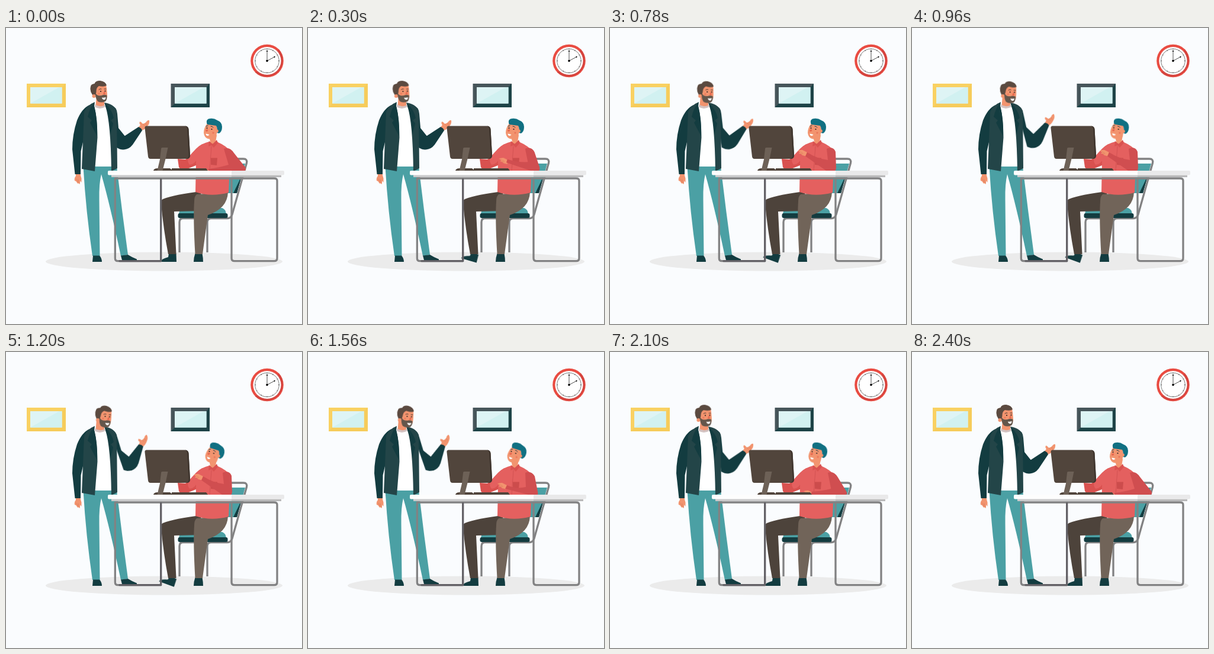
Animation, 500 px wide and 500 px high, one loop 2.73 s. Source, as an HTML page:

```html
<!DOCTYPE html>
<html lang="en">
<head>
<meta charset="utf-8">
<title>Office talk</title>
<style>
html, body { margin: 0; width: 100%; height: 100%; overflow: hidden; background: #fafcfe; }
svg { display: block; width: 100vw; height: 100vh; }

.teal { fill: #4ba0a4; }
.dark { fill: #133c40; }
.coat { fill: #234548; }
.skin { fill: #f2946f; }
.blush { fill: #e8684f; }
.red { fill: #e4605f; }
.ink { fill: #2b2523; }
.line { fill: none; stroke-linecap: round; stroke-linejoin: round; }
.steel { stroke: #828283; stroke-width: 3.3; }

.move { animation: 2730ms ease-in-out infinite; }
.head { transform-origin: 157px 133px; animation-name: nod; animation-timing-function: linear; }
.arm { transform-origin: 180px 145px; animation-name: raise; }
.fore { transform-origin: 203px 195px; animation-name: bend; }
.look { transform-origin: 348px 191px; animation-name: look; }
.foot { transform-origin: 281px 384px; animation-name: tap; }
.sleeve { animation-name: sleeve; animation-timing-function: linear; }
.hand { animation-name: hand; animation-timing-function: linear; }

@keyframes nod {
  0%, 9%, 80%, 100% { transform: none; }
  44%, 57% { transform: translate(3.5px, 1px) rotate(9deg); }
}
@keyframes raise {
  0%, 23%, 81%, 100% { transform: none; }
  44%, 57% { transform: rotate(-12deg); }
}
@keyframes bend {
  0%, 23%, 81%, 100% { transform: none; }
  44%, 57% { transform: rotate(-6deg); }
}
@keyframes look {
  0%, 29%, 86%, 100% { transform: none; }
  44%, 68% { transform: rotate(10deg); }
}
@keyframes tap {
  0%, 2%, 57%, 100% { transform: none; }
  15%, 48% { transform: rotate(20deg); }
}
@keyframes sleeve {
  0%, 87.9%, 100% { d: path("M368 204Q378 200 385 211L404 235Q408 242 398 242L342 242L342 238Q360 236 376 231Z"); }
  19%, 48% { d: path("M366 204Q377 199 381 209L382 236Q382 246 368 243L330 216.5L333 210Q350 221 368 223Z"); }
  57.1% { d: path("M367 204Q377 200 383 210L388 236Q390 245 380 243L333 231L336 225Q352 232 368 228Z"); }
  67% { d: path("M368 204Q377 200 384 211L395 236Q398 243 388 242L337 241L339 234Q357 234 371 231Z"); }
}
@keyframes hand {
  0%, 87.9%, 100% { transform: translate(13px, 32px); }
  19%, 48% { transform: none; }
  57.1% { transform: translate(3px, 15px); }
  67% { transform: translate(7px, 24px); }
}
</style>
</head>
<body>
<svg viewBox="0 0 500 500">
  <ellipse cx="267" cy="394.5" rx="200" ry="16" fill="#ebebeb"/>

  <!-- clock -->
  <circle cx="441" cy="55.5" r="27.8" fill="#e94c42"/>
  <path d="M461 36A28 28 0 0 1 421 75Z" fill="#d5443e"/>
  <circle cx="441" cy="55.5" r="23.6" fill="#fff"/>
  <circle cx="441" cy="55.5" r="20.3" class="line" stroke="#444" stroke-width=".7"/>
  <circle cx="441" cy="55.5" r="19.8" class="line" stroke="#333" stroke-width="1.2" pathLength="12" stroke-dasharray=".1 .9" stroke-dashoffset=".05" style="stroke-linecap:butt"/>
  <path d="M441 55.5V38M441 55.5L454 48.6" class="line" stroke="#222" stroke-width=".8"/>
  <circle cx="441" cy="55.5" r="1.8"/><circle cx="441" cy="39" r="1.1"/><circle cx="453.5" cy="48.8" r="1.1"/>

  <!-- pictures -->
  <path d="M35 94H101V134H35Z" fill="#f9d162"/>
  <path d="M101 94V134H35L41 127.5H94.5V100Z" fill="#f6cc5b"/>
  <path d="M278.5 94H344V134H278.5Z" fill="#46555a"/>
  <path d="M344 94V134H278.5L285 127.5H338V100Z" fill="#1d4347"/>
  <g id="glass"><path d="M41 100H94.5V127.5H41Z" fill="#def4f5"/><path d="M41 127.5L90 100H94.5V127.5Z" fill="#d1f1f1"/></g>
  <use href="#glass" x="244"/>

  <!-- standing man -->
  <path class="teal" d="M130.500 234Q135 310 146 385H158.500L157.500 290Q157 262 161 247Q176 300 194 385L206 383Q196 310 187 234Z"/>
  <path class="dark" d="M147 384.500H158Q162 389 162 395H146Z"/>
  <path class="dark" d="M194 384.500L206 383Q214 388 221 390.500V392H196Z"/>
  <path class="skin" d="M117.500 245H125.500Q126 250 127.500 254L127.500 261L125.500 258L124.500 264L122 262L121 263L118.500 259L116 258Q115 253 118 250Z"/>
  <path d="M119 255L121 260M122 256L123.500 262" class="line" stroke="#d97b5b" stroke-width=".7"/>
  <path d="M149 132H171Q178 150 177.500 232Q164 236 150 232Z" fill="#fff"/>

  <g class="move arm">
    <g class="move fore">
      <path class="skin" d="M224 170Q224 166 227 164Q224 160 226.500 158Q229 159 231 162L236 160Q239 155 242 156Q243 162 238 167Q234 172 229 173Z"/>
      <path d="M231 162L234 165M236 160L237 164" class="line" stroke="#d97b5b" stroke-width=".7"/>
      <path class="dark" d="M193 184L201 182L224 167Q229 169 230 173L214 197Q207 206 198 205Z"/>
    </g>
    <path class="dark" d="M178 131Q187 133 188 145L190 169L202 184Q210 198 203 204Q197 208 187 202Z"/>
  </g>
  <path class="dark" d="M141 130Q128 136 120 156Q112 180 112 205L116.500 247H126L126.500 208L133 180Z"/>
  <path class="coat" d="M150 125Q137 130 132 142L128 238L150 242L154.500 185Q154 150 149 132Z"/>
  <path class="coat" d="M166 126Q182 128 187 140L188 237L178 242Q177 160 168 132Z"/>
  <path class="dark" d="M149 126Q141 136 138 150L145 156L142 160L154 183Q155 155 149 132Z"/>
  <path class="dark" d="M167 127Q179 138 182 152L177 156L181 161L176.500 181Q175 149 168 132Z"/>

  <path class="skin" d="M153 114H166V131Q159 136 151.500 131Z"/>
  <path d="M150.500 129Q158 135 167 130L168 133Q158 139 150 133Z" fill="#d3c2c1"/>
  <g class="move head">
    <path class="skin" d="M150 97L169 96Q171 107 171 115Q170 124 161 124Q152 121 150 113Z"/>
    <path fill="#5b4a40" d="M151 114L146 113Q141 106 143 99Q143 95 149.500 94Q151 89 159 89Q168 90 170 97Q166 100 157 98Q152 101 152.500 108Z"/>
    <circle class="skin" cx="148.500" cy="115" r="3"/>
    <path fill="#64564b" d="M151 110Q153 113 156 114Q160 115 164 113Q168 112 170.500 114Q171 121 168 124Q161 127 155 124Q151 119 151 110Z"/>
    <path fill="#fff" d="M162 117.500Q165 118 168.500 116.800Q168.500 121.300 165.500 121.300Q162.500 120.700 162 117.500Z"/>
    <circle class="blush" cx="157" cy="111" r="1.600" opacity=".6"/>
    <path class="blush" d="M166 107Q169 110 167 112Q165 113 164 111Z"/>
    <circle class="ink" cx="160" cy="107" r="1.100"/><circle class="ink" cx="167.500" cy="106.500" r="1.100"/>
    <path d="M157 104Q159 102 161 103M166 103L169 103" class="line" stroke="#4b3b33"/>
  </g>

  <!-- chair -->
  <path class="teal" d="M374 229H404L390 279H372Z"/>
  <path class="dark" d="M397 252L401 240L404 229L390 279H384Z"/>
  <path class="teal" d="M298 304H365Q371 306 372 314H292Q293 306 298 304Z"/>
  <path class="line steel" d="M376 221H401Q408 221 406.500 228L382 315Q380 321.500 374 321.500H347Q340 321.500 340 328V379M318 321.500H299Q293 321.500 293 328V379" style="stroke-linecap:butt"/>
  <rect class="dark" x="290.500" y="313" width="84" height="8" rx="3"/>

  <!-- seated man -->
  <g class="move foot"><path class="dark" d="M275 381H287.500L288 395H261Q262 390 274 387Z"/></g>
  <path d="M330 276Q285 281 265 289Q261 291 262 297Q266 340 274 382H287.500L284 310L325 309Z" fill="#4d433b"/>
  <path class="dark" d="M319.500 381H331.500Q333 388 333 395H317Q317 388 319.500 381Z"/>
  <path d="M322 281L375 277Q374 305 341 316L332 382H319.500Q316 320 318 293Q318 284 322 281Z" fill="#716459"/>
  <path d="M332 196Q321 202 310 217L303 222L290 221L292 235Q294 240 306 238L326 230Z" fill="#d9514f"/>
  <path class="red" d="M343 192Q330 195 321 204L309 217Q305 225 310 231Q318 230 321 224L320 277Q346 286 376 278L379 208Q372 199 356 192Z"/>
  <path d="M346 219.500H357L356 232L346 231Z" fill="#cc4c4c"/>
  <path d="M347 200L344 241" class="line" stroke="#cf5050" stroke-width=".8"/>
  <path class="skin" d="M343 181H356L354 193Q349 198 345 193Z"/>
  <path d="M343 191L349 196L356 189L358 194L351 202L347 198L342 200Z" fill="#d95250"/>
  <g class="move look">
    <path class="skin" d="M340 161Q334 169 334 177Q335 185 341 187Q350 189 355 184L357 172L355 162Z"/>
    <path fill="#107082" d="M340 163Q337 156 342 153.500Q350 151 357 156Q365 159 365 167Q365 175 360 178L356 177Q358 170 355 165Q348 164 340 163Z"/>
    <circle class="skin" cx="356" cy="174" r="2.800"/>
    <path fill="#fff" d="M337.500 178.500Q341 179.200 343.500 180Q342.500 182.300 340 182Q337.500 181.500 337.500 178.500Z"/>
    <path class="blush" d="M341 171Q337 171 337 174Q339 176 341 174Z"/>
    <circle class="blush" cx="350" cy="177" r="1.600" opacity=".7"/>
    <circle class="ink" cx="339.500" cy="169" r="1.100"/><circle class="ink" cx="347.500" cy="171" r="1.100"/>
    <path d="M338 166L341 165M346 166Q349 166 350 168" class="line" stroke="#17404a"/>
  </g>
  <g class="move hand">
    <path class="skin" d="M333 210L325 206Q320 205.500 317 207.500L321 209.500L319 212L322 212.500L325 215L331 216.500Z"/>
    <path d="M321 209.500L325 210.500M322 212.500L326 212.500" class="line" stroke="#d97b5b" stroke-width=".7"/>
  </g>
  <path class="move sleeve" fill="#d04e50" d="M368 204Q378 200 385 211L404 235Q408 242 398 242L342 242L342 238Q360 236 376 231Z"/>

  <!-- computer -->
  <path d="M237 165.500H303Q308 166 308.500 171L311 215Q311 221 305 221H244Q240.500 221 240 217L234.500 169Q234 166 237 165.500Z" fill="#51453c"/>
  <path d="M303 165.500Q308 166 308.500 171L311 215Q311 221 305 221Q309 219 308.500 214L306 171Q306 167 303 165.500Z" fill="#3f352e"/>
  <path d="M249 241Q250 237 256 237H277L282 241ZM280 241V237H338L341 241Z" fill="#51453c"/>
  <path d="M262 204Q262 202 264 202H273.500L270 219L264.500 241H255.500L260 222Z" fill="#6d6157"/>

  <!-- desk -->
  <g class="line" stroke-width="3.300">
    <path class="steel" d="M184.300 254V389Q184.300 393.700 189 393.700H261.500M184.300 254H381V389Q381 393.700 386 393.700H453Q458 393.700 458 389V258Q458 254 453 254H381"/>
    <path d="M261.700 255.500V393.700H192" stroke="#626065"/>
  </g>
  <path d="M178 247H465V252H178Z" fill="#cacacb"/>
  <path d="M381 247H465V252H381Z" fill="#b9b9ba"/>
  <rect x="172" y="241" width="298" height="7.500" rx="2" fill="#fdfdfd"/>
  <path d="M381 241H468Q470 241 470 243V246.500Q470 248.500 468 248.500H381Z" fill="#e9e9ea"/>
</svg>
</body>
</html>
```
